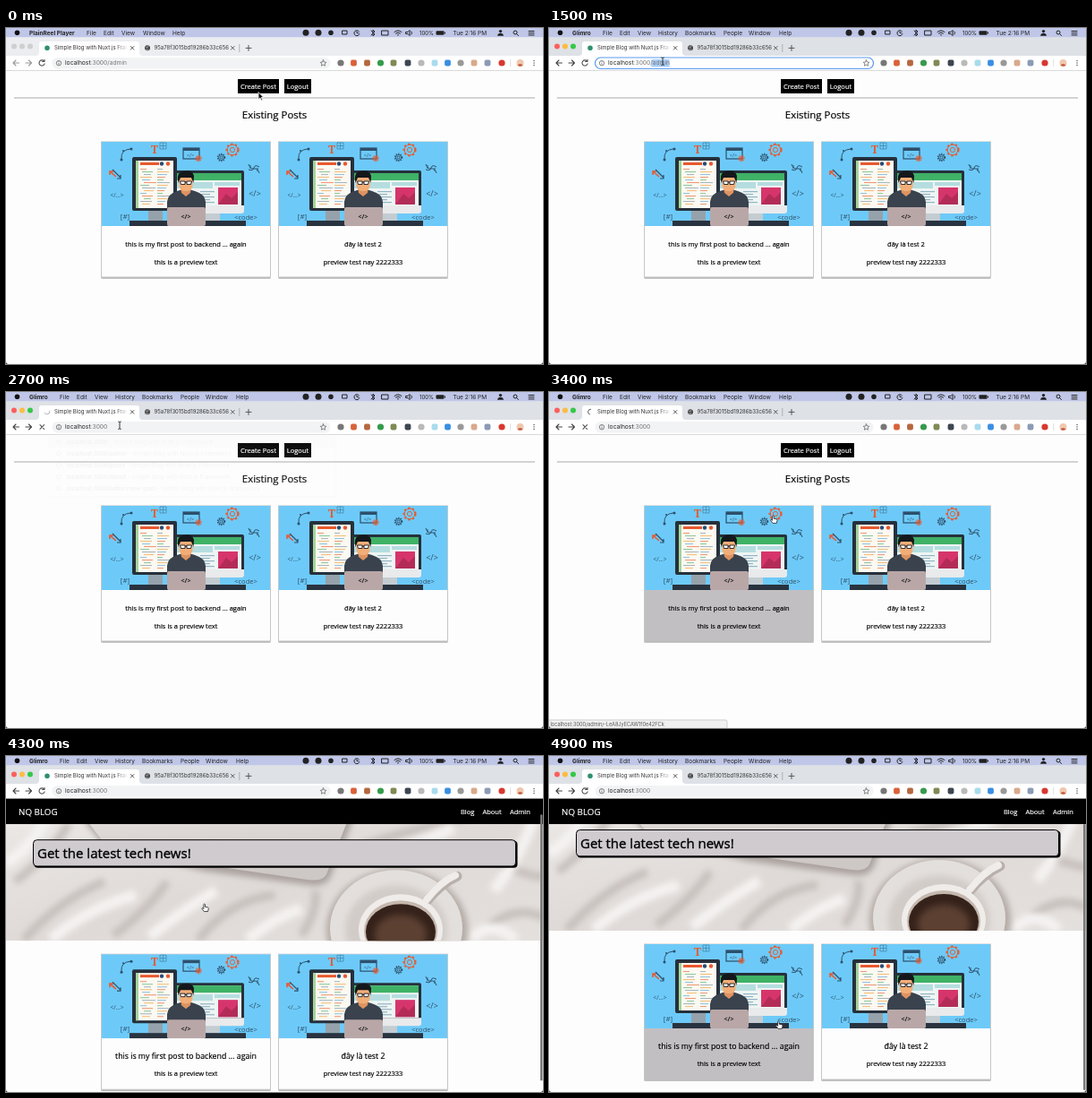
Write an HTML page that moves like this. It is 600 px wide and 375 px high and loops after 5000 ms.

```html
<!DOCTYPE html>
<html lang="en">
<head>
<meta charset="utf-8">
<title>Blog demo</title>
<style>
  html, body { margin: 0; height: 100%; overflow: hidden; background: #fff; }
  svg { display: block; width: 100vw; height: 100vh; }
  text { font-family: "Open Sans", sans-serif; font-size: 7.5px; white-space: pre; }
  .page text { stroke: #000; stroke-width: .18px; }
  .page .white { stroke: #fff; }
  .page .art { stroke: none; }
  .ui text { font-family: Inter, Roboto, sans-serif; font-size: 6.5px; fill: #222; }
  .ui .tab { font-size: 6px; fill: #333; }
  .ui .url { font-size: 6.7px; }
  .ui .dim { fill: #777; }
  .ui .small { font-size: 5.6px; fill: #555; }
  .mid { text-anchor: middle; }
  .line { fill: none; stroke: #555; stroke-linecap: round; stroke-linejoin: round; }
  .white { fill: #fff; }
</style>
</head>
<body>
<svg id="stage" viewBox="0 0 600 375" preserveAspectRatio="none"></svg>
<script>
const rect = (x, y, w, h, fill, more = '') =>
  `<rect x="${x}" y="${y}" width="${w}" height="${h}" fill="${fill}" ${more}/>`;
const dot = (x, y, r, fill, more = '') => `<circle cx="${x}" cy="${y}" r="${r}" fill="${fill}" ${more}/>`;
const oval = (x, y, rx, ry, fill, more = '') =>
  `<ellipse cx="${x}" cy="${y}" rx="${rx}" ry="${ry}" fill="${fill}" ${more}/>`;
const path = (d, more = 'class="line"') => `<path d="${d}" ${more}/>`;
const text = (x, y, s, more = '') => `<text x="${x}" y="${y}" ${more}>${s}</text>`;
const group = (id, body, more = '') => `<g id="${id}" ${more}>${body}</g>`;
const range = (n, f) => Array.from({ length: n }, (_, i) => f(i)).join('');
const ink = '#2d4f6b', orange = '#e8592f';

const gear = (x, y, r, color) =>
  dot(x, y, r, 'none', `stroke="${color}"`) +
  dot(x, y, r * .45, 'none', `stroke="${color}" stroke-width=".9"`) +
  dot(x, y, r + 1, 'none', `stroke="${color}" stroke-width="1.5" stroke-dasharray="${r * .42} ${r * .44}"`);

// Illustration, 188 x 94
function artwork() {
  const code = (x, y, s, size) => text(x, y, s, `class="mid art" style="font-size:${size}px" fill="${ink}"`);
  const hues = ['#ef9a78', '#8fc9a0', '#a9b6bf', '#f3bf7a', '#93c3de'];
  return rect(0, 0, 188, 94, '#6dcaf8') +
    path('M22 19Q21 9 32 8', `fill="none" stroke="${ink}"`) +
    dot(22, 20, 1.5, ink) + dot(33, 8, 1.5, ink) + dot(24, 10, 1, ink) +
    text(55, 13, 'T', `class="art" style="font:bold 12px 'Noto Serif',serif" fill="${orange}"`) +
    path('M65 1h7v7h-7zM68.5 1v7M65 4.5h7', 'fill="none" stroke="#4789ae" stroke-width=".8"') +
    rect(91, 7, 18, 12, 'none', `stroke="${ink}" stroke-width="1.2"`) + rect(91, 7, 18, 3, ink) +
    code(99, 16.5, '&lt;/&gt;', 5.5) + gear(108, 18.5, 2, orange) +
    gear(133.5, 17.5, 3, ink) + gear(146, 9, 5.8, orange) +
    path('M164 25q2 6 6 5t6 5M164 31q5 2 6-2t6-1M166 26v4M174 29v4', `fill="none" stroke="${ink}"`) +
    path('M16 39l-7-6m0 4v-4h4', `fill="none" stroke="${orange}" stroke-width="1.6"`) +
    path('M12 31l9 9m-4 1h4v-4', `fill="none" stroke="${ink}" stroke-width="1.2"`) +
    code(17, 62, '&lt;/...&gt;', 6.5) + code(171, 61, '&lt;/&gt;', 9) +
    code(26, 86, '[#]', 8) + code(161, 87, '&lt;code&gt;', 7.5) +
    // right screen
    rect(108, 78, 24, 10, '#c3ccd1') + rect(81, 32, 78, 41, '#26303b', 'rx="2"') +
    path('M81 71h78v6q0 3-3 3H84q-3 0-3-3z', 'fill="#e9eaec"') +
    rect(84, 35, 72, 36, '#eef5f3') + rect(84, 35, 72, 8, '#3fb266') +
    rect(87, 37, 14, 1, '#fff') + rect(84, 45, 40, 7, '#b5dde0') + rect(126, 45, 28, 4, '#b5dde0') +
    rect(130, 51, 22, 19, '#d6356c') + path('M130 70l9-12 6 5 7-7v14z', 'fill="#b32c58"') +
    range(5, i => rect(110, 55 + i * 3, 16 - i % 2 * 5, 1.2, '#92b4c4')) +
    // left screen
    rect(52, 74, 16, 14, '#96a2ab') + rect(34, 17, 50, 60, '#26303b', 'rx="2"') +
    rect(38, 21, 42, 53, '#fbf9f2') + rect(38, 21, 3, 53, '#a5d39c') +
    rect(43, 23, 21, 3, orange) + dot(67, 24.5, 2.2, '#274b75') + dot(74, 24.5, 2.2, orange) +
    range(14, i => rect(43 + i % 3 * 2, 30 + i * 3, 7 + i * 5 % 9, 1.1, hues[i % 5]) +
      rect(62, 30 + i * 3, 6 + i * 7 % 9, 1.1, hues[(i + 2) % 5])) +
    rect(31, 88, 43, 6, '#29333f') + rect(114, 88, 47, 6, '#29333f') +
    // person and laptop
    path('M73 88V67Q74 58 84 55L94 52l10 3Q115 58 116 67v21z', 'fill="#39424d"') +
    path('M88 51h12l-1 6-5 4-5-4z', 'fill="#dd9361"') +
    rect(86.5, 36, 15, 19, '#f2ae78', 'rx="6"') +
    path('M85.5 46Q83 34 91 33Q101 31 103 38L102.5 46 100 40H88z', 'fill="#14171c"') +
    path('M87.5 44h5.5v3.5h-4.5zM95 44h5.5l-1 3.5H95zM93 45h2', 'fill="#fff" stroke="#14171c" stroke-width=".9"') +
    rect(73, 73, 43, 21, '#b9a7a7', 'rx="2"') +
    text(94, 86, '&lt;/&gt;', 'class="mid art" style="font-size:7px;font-weight:bold" fill="#222"');
}

function card(x, y, h, title, titleY, titleSize, preview, previewY, hoverId) {
  return rect(x - .5, y + 1, 189, h + .8, '#b5b5b5') + rect(x - .5, y, 189, h, '#fefdfe', 'stroke="#c6c6c6"') +
    rect(x, y, 188, h, '#c2bfc2', `id="${hoverId}"`) +
    `<use href="#art" x="${x}" y="${y}"/>` +
    text(x + 94, titleY, title, `class="mid" style="font-size:${titleSize}px"`) +
    text(x + 94, previewY, preview, 'class="mid"');
}

const cards = (y, h, titleY, size, previewY, id) =>
  card(107, y, h, 'this is my first post to backend ... again', titleY, size, 'this is a preview text', previewY, id) +
  card(305, y, h, 'đây là test 2', titleY, size, 'preview test nay 2222333', previewY, id + '2');

const adminPage = rect(0, 47, 600, 328, '#fefdfe') +
  rect(259, 57, 46, 16, '#000') + text(282, 68, 'Create Post', 'class="mid white"') +
  rect(311, 57, 30, 16, '#000') + text(326, 68, 'Logout', 'class="mid white"') +
  rect(9, 77.5, 582, 1, '#aaa') +
  text(300, 100.5, 'Existing Posts', 'class="mid" style="font-size:11.4px"') +
  cards(127, 151, 243.5, 7.5, 263.7, 'adminHover');

// Bed sheet, laptop and coffee as soft shapes
const folds = (d, color, width) => path(d, `fill="none" stroke="${color}" stroke-width="${width}" filter="url(#soft)"`);
const hero = rect(0, 76, 600, 140, 'url(#sheet)') +
  folds('M10 150Q50 120 70 85M20 215Q60 170 110 150M120 210Q160 180 180 150M215 215Q250 170 300 165M330 210Q350 180 345 160M530 110Q560 140 600 145M540 200Q570 175 600 190M400 110Q440 95 520 76', '#c6bfbb', 9) +
  folds('M0 130Q30 110 45 80M50 215Q90 180 145 165M160 212Q200 180 235 160M270 215Q300 190 330 180M400 125Q460 110 500 90M545 160Q570 130 590 80M520 215Q540 190 570 215', '#f5f3f2', 12) +
  path('M86 80L110 110 220 138 340 154Q356 156 362 146L388 80z', 'fill="#a9a19d" filter="url(#soft)"') +
  path('M86 76L108 105 220 131 338 148Q354 150 358 142L384 76z', 'fill="url(#metal)"') +
  oval(437, 204, 79, 68, '#b3aaa5', 'filter="url(#soft)"') +
  oval(436, 202, 74, 65, '#e3dfdc') + oval(436, 204, 57, 50, '#d2ccc8', 'filter="url(#soft)"') +
  path('M470 172Q486 152 504 144', 'fill="none" stroke="#b9b0ab" stroke-width="11" stroke-linecap="round"') +
  path('M470 170Q486 150 502 143', 'fill="none" stroke="#efecea" stroke-width="8" stroke-linecap="round"') +
  oval(441, 204, 47, 40, '#efecea') + oval(441, 205, 41, 34, '#c5b8ae') +
  oval(441, 206, 39, 31, '#35221a') + oval(441, 209, 29, 22, '#5b4030', 'filter="url(#soft)"');

const homePage = rect(0, 47, 600, 328, '#fefdfe') +
  group('scroll', `<g clip-path="url(#heroClip)">${hero}</g>` +
    rect(31.5, 104.5, 540, 30, '#000', 'rx="4"') +
    rect(30.5, 103.5, 539, 29.3, '#cfcbce', 'rx="4" stroke="#000"') +
    text(35, 124, 'Get the latest tech news!', 'style="font-size:15px;stroke-width:.35px"') +
    cards(231, 151, 347.5, 8.75, 366.7, 'homeHover')) +
  group('header', rect(0, 44, 600, 32, '#000') +
    text(14, 65.5, 'NQ BLOG', 'class="white" style="font-size:9.8px"') +
    [[508, 'Blog'], [532.5, 'About'], [563, 'Admin']].map(([x, s]) => text(x, 64.7, s, 'class="white"')).join('')) +
  rect(597, 76, 2.5, 297, '#777', 'rx="1.2" id="thumb"');

const menu = items => items.map(([x, s], i) => text(x, 7.8, s, i ? '' : 'font-weight="700"')).join('');

const menuBar = rect(0, 0, 600, 11, '#bfc6e8') + dot(12.5, 5.2, 2.8, '#111') +
  group('menuPlayer', menu([[26, 'PlainReel Player'], [90, 'File'], [109, 'Edit'], [129, 'View'], [153, 'Window'], [186, 'Help']])) +
  group('menuBrowser', menu([[26, 'Glimro'], [60, 'File'], [79, 'Edit'], [99, 'View'], [122, 'History'],
    [152, 'Bookmarks'], [195, 'People'], [223, 'Window'], [257, 'Help']])) +
  dot(335, 5.3, 3.5, '#222') + dot(349, 5.3, 3.5, '#222') + dot(363, 5.3, 2.8, '#222') +
  path('M376 3h5v4h-5zM394.5 4a3 3 0 1 0 .4 2.5M392 4v1.6h1.4M408 3l4 4-2 2V2l2 2-4 4M420 3h7v5h-7zM434 4.5q4-3.5 8 0M435.5 6q2.5-2 5 0M447 4.5h2l2-2v6l-2-2h-2zM453 4q1.3 1.5 0 3', 'class="line" style="stroke:#222"') +
  dot(438, 7.7, .8, '#222') +
  text(462, 7.8, '100%', 'style="font-size:6px"') +
  rect(480.5, 3.2, 9, 4.6, '#222', 'rx="1"') + rect(490, 4.5, 1, 2, '#222') +
  text(499.5, 7.8, 'Tue 2:16 PM') +
  dot(552.5, 3.6, 1.7, '#222') + path('M549 8.7q.5-3 3.5-3t3.5 3z', 'fill="#222"') +
  dot(569, 5, 2, 'none', 'stroke="#222"') + path('M570.5 6.5l2 2M584 3.5h6M584 5.7h6M584 7.9h6', 'class="line" style="stroke:#222"');

const extensions = [[374, '#777'], [388.5, '#d9623b'], [403.5, '#b5683f'], [418.5, '#359b4c'], [433, '#7f8a55'], [449, '#3d4650'],
  [464, '#b9b9b9'], [479, '#a8dcec'], [493.5, '#3a8fe2'], [508, '#999'], [523, '#d9a98e'], [538, '#8c9bb5'], [554, '#d8382f']];

const tabStrip = rect(0, 10.2, 600, 20.8, '#dee1e6', 'id="strip"') +
  [['#fc605c', 9], ['#fdbc40', 18], ['#34c84a', 27]].map(([c, x]) => dot(x, 20.5, 3, c, 'class="light"')).join('') +
  path('M33 31Q37 31 37 27V18Q37 15 40 15H146Q149 15 149 18V27Q149 31 153 31z', 'fill="#fff"') +
  dot(46, 22.2, 2.8, '#2f8f6f', 'id="favicon"') +
  path('M46.5 19.2a3 3 0 0 0-1 5.8', 'class="line" id="spinner"') +
  `<g clip-path="url(#tabClip)">${text(54, 24.4, '', 'class="tab" id="title"')}${rect(122, 16, 14, 14, 'url(#fade)')}</g>` +
  path('M139.3 20.5l3.6 3.6m0-3.6l-3.6 3.6M251.5 20.5l3.6 3.6m0-3.6l-3.6 3.6M271 19.4v6M268 22.4h6', 'class="line"') +
  dot(158, 22.3, 3, '#444') + path('M156 21l2 1 1-2M156 24h3', 'class="line" style="stroke:#ccc;stroke-width:.7"') +
  text(165.5, 24.4, '95a78f3015bd19286b33c656', 'class="tab"') +
  rect(260.5, 18, .7, 9, '#999');

const toolbar = rect(0, 31, 600, 16, '#fff') + rect(0, 47, 600, .7, '#ccc') +
  path('M14.5 39H8m3-3l-3 3 3 3M22 39h6.5m-3-3l3 3-3 3', 'class="line" id="arrows" stroke-width="1.1"') +
  path('M42.5 37a3.1 3.1 0 1 0 .6 2.8M43 35.3v2.2h-2.4', 'class="line" id="reload" stroke-width="1.1"') +
  path('M38 36.7l4.6 4.6m0-4.6L38 41.3', 'class="line" id="stop" stroke-width="1.1"') +
  rect(51.5, 33, 311, 12.5, '#f1f3f4', 'rx="6.2" id="pill" stroke-width="1.2"') +
  dot(59, 39.2, 2.7, 'none', 'stroke="#666" stroke-width=".8"') + rect(58.6, 38.8, .8, 2, '#666') + rect(58.6, 37.4, .8, .8, '#666') +
  rect(66, 35, 69, 8.5, '#a9cdf8', 'id="selection"') +
  `<text x="66" y="41.4" class="url">localhost<tspan class="dim" id="urlTail"></tspan></text>` +
  path('M354.5 35.8l1 2.2 2.3.3-1.7 1.6.4 2.3-2-1.1-2 1.1.4-2.3-1.7-1.6 2.3-.3z', 'class="line" stroke-width=".7"') +
  extensions.map(([x, c], i) => i % 3 ? rect(x - 3.4, 35.6, 6.8, 6.8, c, 'rx="1.8"') : dot(x, 39, 3.6, c)).join('') +
  rect(563.5, 35, .6, 8, '#ccc') + dot(574.5, 39, 4, '#efc8ad') + path('M571.5 41.5a4 4 0 0 0 6 0q-3-3-6 0', 'fill="#c45b43"') +
  range(3, i => dot(590, 36.5 + i * 2.5, .75, '#555'));

const suggestions = ['', '/admin', '/posts', '/about', '/admin/new-post'];
const dropdown = rect(47, 48, 322, 70, '#777', 'rx="3" opacity=".25"') + rect(47, 47.5, 321, 69, '#fff', 'rx="3"') +
  rect(47, 49, 321, 13, '#e8eaed') +
  suggestions.map((s, i) => dot(59, 55.5 + i * 13, 2.3, 'none', 'stroke="#777" stroke-width=".8"') +
    text(68, 57.8 + i * 13, `localhost:3000${s}<tspan class="dim"> - Simple Blog with Nuxt.js Framework</tspan>`)).join('');

const status = rect(-2, 366, 201, 12, '#f0f0f0', 'rx="2" stroke="#bbb" stroke-width=".7"') +
  text(1.5, 372.6, 'localhost:3000/admin/-LeA8JyECAW1f0e42FCk', 'class="small"');

const outline = 'stroke-width=".8" stroke-linejoin="round"';
const cursors = group('arrow', path('M0-3.5v8.2l1.9-1.7 1.4 3 1.3-.6-1.3-2.9h2.5z', `fill="#111" stroke="#fff" ${outline}`)) +
  group('beam', path('M-1.7-4Q0-4 0-3Q0-4 1.7-4M0-3V3.5M-1.7 4.5Q0 4.5 0 3.5Q0 4.5 1.7 4.5', 'fill="none" stroke="#222" stroke-width=".9"')) +
  group('hand', path('M-1.4-3.6q.8-1 1.6 0v2.8l3 .6q1 .3.8 1.5l-.7 3.1h-4.2l-2.6-3.2q.3-1.3 1.4-.5l.7.7z', `fill="#fff" stroke="#222" ${outline}`));

const stage = document.getElementById('stage');
stage.innerHTML = `<defs>
  <linearGradient id="sheet" x2="1" y2="1"><stop stop-color="#ebe8e6"/><stop offset=".5" stop-color="#dfdad7"/><stop offset="1" stop-color="#e4e0dd"/></linearGradient>
  <linearGradient id="metal" x2=".2" y2="1"><stop stop-color="#e3dfdd"/><stop offset="1" stop-color="#cdc7c5"/></linearGradient>
  <linearGradient id="fade"><stop stop-color="#fff" stop-opacity="0"/><stop offset="1" stop-color="#fff"/></linearGradient>
  <filter id="soft" x="-20%" y="-20%" width="140%" height="140%"><feGaussianBlur stdDeviation="3.5"/></filter>
  <clipPath id="heroClip">${rect(0, 76, 600, 140, '#000')}</clipPath>
  <clipPath id="tabClip">${rect(52, 16, 84, 14, '#000')}</clipPath>
  <clipPath id="artClip">${rect(0, 0, 188, 94, '#000')}</clipPath>
  <g id="art" clip-path="url(#artClip)">${artwork()}</g></defs>` +
  group('admin', adminPage, 'class="page"') + group('home', homePage, 'class="page"') +
  `<g class="ui">${menuBar}${tabStrip}${toolbar}${group('dropdown', dropdown)}${group('status', status)}</g>` +
  path('M0 372Q0 375 3 375H0zM600 372Q600 375 597 375H600z', 'fill="#444"') +
  group('cursor', cursors);

const el = id => document.getElementById(id);
const show = (id, on) => el(id).style.display = on ? '' : 'none';
const set = (id, name, value) => el(id).setAttribute(name, value);
const clamp = v => Math.max(0, Math.min(1, v));
const ramp = (t, a, b) => clamp((t - a) / (b - a));
const lights = [...document.querySelectorAll('.light')].map(node => [node, node.getAttribute('fill')]);

// Eased interpolation through [time, ...values]
function follow(keys, t) {
  const i = keys.findIndex(k => k[0] > t);
  if (i < 0) return keys[keys.length - 1].slice(1);
  const [a, b] = [keys[i - 1], keys[i]];
  const k = ramp(t, a[0], b[0]), e = k * k * (3 - 2 * k);
  return a.slice(1).map((v, j) => v + (b[j + 1] - v) * e);
}

const maxScroll = 21;
const scrollPath = [[0, 0], [4150, 0], [4500, 25], [4850, maxScroll]];
const pointerPath = [[0, 282, 75], [600, 282, 75], [1100, 127, 37], [2900, 127, 37], [3350, 251, 142],
  [4150, 251, 142], [4500, 178, 211], [4850, 257, 300]];

function draw(t) {
  const active = t >= 300, home = t >= 3600, loading = t >= 2600 && t < 4100;
  const focused = t >= 1100 && t < 2600;

  show('menuPlayer', !active);
  show('menuBrowser', active);
  set('strip', 'fill', active ? '#dee1e6' : '#ebedf0');
  lights.forEach(([node, color]) => node.setAttribute('fill', active ? color : '#cfcfcf'));
  el('arrows').style.stroke = active ? '#444' : '#999';

  show('favicon', !loading);
  show('spinner', loading);
  set('spinner', 'transform', `rotate(${(t - 3400) * 1.2} 46 22.2)`);
  set('spinner', 'opacity', t < 2800 ? .4 : 1);
  show('reload', !loading);
  show('stop', loading);
  el('title').textContent = home && loading ? 'localhost:3000' : 'Simple Blog with Nuxt.js Framework';

  set('pill', 'fill', focused ? '#fff' : '#f1f3f4');
  set('pill', 'stroke', focused ? '#5b9bf0' : 'none');
  el('urlTail').textContent = ':3000' + (t < 1700 ? '/admin' : t < 1900 ? '/' : '');
  show('selection', focused && (t < 1300 || t >= 1400 && t < 1700));
  set('selection', 'x', t < 1300 ? 66 : 114.5);
  set('selection', 'width', t < 1300 ? 69 : 20);
  show('dropdown', t >= 1900 && t < 2800);
  set('dropdown', 'opacity', 1 - .94 * ramp(t, 2600, 2700));

  show('admin', !home);
  show('home', home);
  show('status', t >= 3300 && t < 3600);
  set('adminHover', 'opacity', ramp(t, 3150, 3400));
  set('homeHover', 'opacity', ramp(t, 4550, 4800));
  show('adminHover2', false);
  show('homeHover2', false);

  const [y] = follow(scrollPath, t);
  set('scroll', 'transform', `translate(0 ${-y})`);
  set('header', 'transform', `translate(0 ${-Math.max(0, y - maxScroll)})`);
  show('thumb', t >= 4200);
  set('thumb', 'y', 56 + Math.min(y, maxScroll) * .95);

  const [px, py] = follow(pointerPath, t);
  const beam = t >= 1000 && t < 3000, hand = t >= 3200;
  set('cursor', 'transform', `translate(${px} ${py})`);
  show('beam', beam);
  show('hand', hand);
  show('arrow', !beam && !hand);
}

function tick() {
  draw(Math.floor(performance.now() % 5000 / 100) * 100);
  requestAnimationFrame(tick);
}
tick();
</script>
</body>
</html>
```
